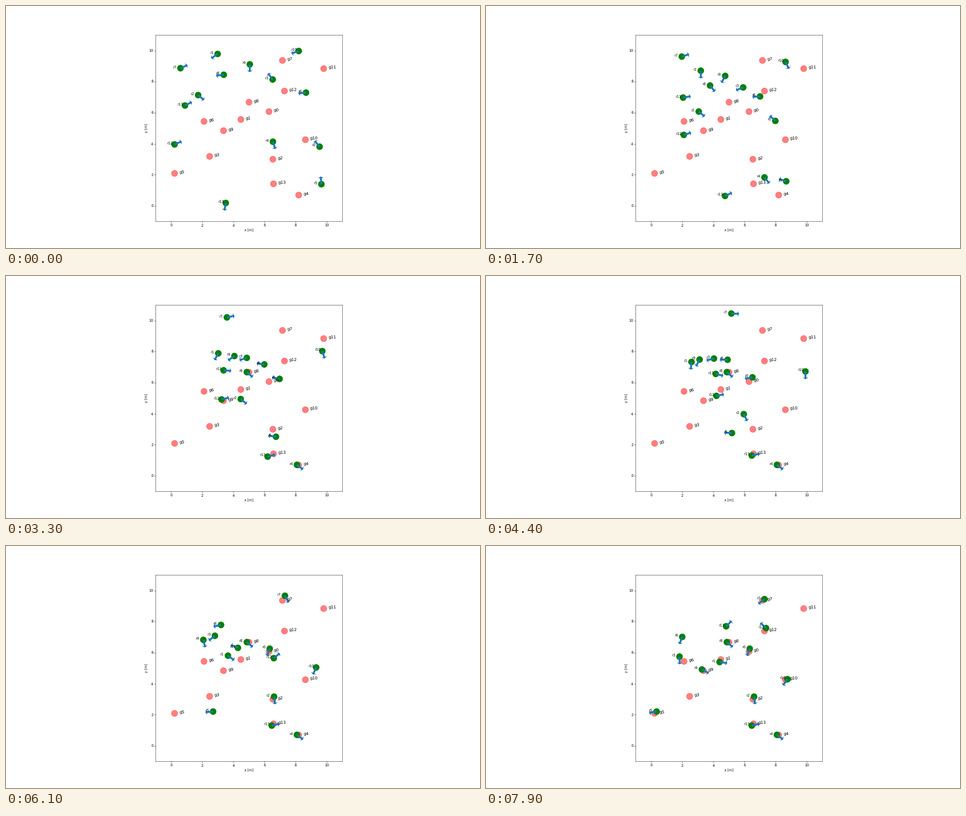
These frames come from a looping animation (1046x535 px, 8 s). A matplotlib script:

```python
import numpy as np
import matplotlib.pyplot as plt
from matplotlib.animation import FuncAnimation
from matplotlib.patches import Arrow, Circle
from matplotlib.transforms import Affine2D

W, H, DPI = 1046, 535, 54.48
STEPS, INTERVAL = 80, 100
RADIUS = 0.2

plt.rcParams.update({"font.family": "DejaVu Sans", "text.hinting": "none"})
# the tiny surplus guards against rounding down to W-1 or H-1
fig = plt.figure(figsize=((W + 1e-3) / DPI, (H + 1e-3) / DPI), dpi=DPI,
                 facecolor="white")
ax = fig.add_subplot()
ax.set_aspect("equal")
ticks = range(0, 11, 2)
ax.set(xlim=(-1, 11), ylim=(-1, 11), xticks=ticks, yticks=ticks)
ax.set_xlabel("x [m]", labelpad=3)
ax.set_ylabel("y [m]", labelpad=3)


def metres(px, py):
    """Stage pixels (y down) to axes metres (y up)."""
    scale = 12 / (0.77 * H)
    return np.array([(px - 0.5125 * W) * scale + 5, (0.89 * H - py) * scale - 1])


class Robot:
    """Follows a smooth curve from a start pose to a stop pose.

    The start is (x, y), the other points (step, x, y). Headings are given at
    both ends; in between the robot faces the way it travels.
    """

    def __init__(self, name, start, face, points, stop_face):
        t, px, py = np.array([(0, *start), *points], float).T
        self.t = t
        self.pos = metres(px, py).T
        self.vel = np.gradient(self.pos, t, axis=0)
        angle = np.arctan2(self.vel[:, 1], self.vel[:, 0])
        for end, deg in ((0, face), (-1, stop_face)):
            angle[end] = np.radians(deg)
            ahead = np.array([np.cos(angle[end]), np.sin(angle[end])])
            self.vel[end] = ahead * max(0, ahead @ self.vel[end])
        self.angle = np.unwrap(angle)
        self.body = ax.add_patch(Circle((0, 0), RADIUS, color="green"))
        self.arrow = ax.add_patch(Arrow(0, 0, 0.5, 0, width=0.6))
        self.label = ax.text(0, 0, name, fontsize=10, color="k")

    def place(self, step):
        """Cubic Hermite curve through the points."""
        if step >= self.t[-1]:
            return self.pos[-1]
        i = np.searchsorted(self.t, step, side="right") - 1
        span = self.t[i + 1] - self.t[i]
        f = (step - self.t[i]) / span
        a, b = self.pos[i:i + 2]
        va, vb = self.vel[i:i + 2] * span
        ease = f * f * (3 - 2 * f)
        return a + (b - a) * ease + f * (1 - f) * (va * (1 - f) - vb * f)

    def move(self, step):
        x, y = self.place(step)
        angle = np.interp(step, self.t, self.angle)
        self.body.center = x, y
        self.arrow.set_transform(
            Affine2D().rotate(angle).translate(x, y) + ax.transData)
        self.label.set_position((x - 0.5, y))


goals = [(6.29, 6.07), (4.48, 5.56), (6.54, 3.00), (2.475, 3.185), (8.20, 0.695),
         (0.22, 2.09), (2.115, 5.44), (7.155, 9.365), (5.005, 6.675),
         (3.365, 4.84), (8.63, 4.26), (9.805, 8.84), (7.285, 7.395), (6.58, 1.42)]
for n, (gx, gy) in enumerate(goals):
    ax.add_patch(Circle((gx, gy), RADIUS, color="red", alpha=0.5))
    ax.text(gx + 0.3, gy, f"g{n}", fontsize=12, color="k")

robots = []


def robot(start, face, *points, stop):
    robots.append(Robot(f"r{len(robots)}", start, face, points, stop))


robot((692, 311), 130, (17, 638.5, 254), (44, 588, 224), (50, 582, 227), stop=249)
robot((467, 106), 215, (17, 474, 143), (33, 468.5, 171), (44, 453.5, 190),
      (69, 515.5, 256.5), stop=352)
robot((424, 197), -40, (33, 518, 272), (52, 591.5, 333), stop=-82)
robot((588.5, 162.5), 127, (17, 567.5, 180), (44, 503, 182.5), (61, 461, 198.5),
      (79, 427, 244.5), stop=272)
robot((589, 300), -72, (28, 642, 417.5), stop=-37)
robot((696, 394), 95, (17, 662.5, 387.5), (40, 562, 346.5), (61, 457, 366),
      (78, 376.5, 366), stop=191)
robot((662, 191.5), 186, (10, 624, 198.5), (33, 570, 195.5), (61, 474.5, 174.5),
      (79, 433, 201), stop=249)
robot((385, 137.5), 24, (33, 487.5, 91.5), (44, 541.5, 83), (61, 615.5, 110),
      (66, 614.5, 117.5), stop=-142)
robot((480.5, 152), 187, (10, 483, 161.5), (31, 531.5, 212.5), stop=-40)
robot((538, 129), 270, (33, 504, 177), (61, 435.5, 207.5), (77, 476.5, 273),
      stop=-28)
robot((646, 99.5), 199, (10, 649, 111.5), (33, 698, 166), (44, 705, 211),
      (70, 665.5, 294.5), stop=233)
robot((395, 220), 27, (17, 435, 202.5), (44, 507, 216.5), (54, 523, 221),
      (64, 508, 224), (79, 530, 177.5), stop=45)
robot((372, 306), 23, (17, 436.5, 285), (44, 508.5, 265), (61, 591, 248),
      (77, 618, 181.5), stop=137)
robot((485, 435.5), 260, (10, 495, 436), (17, 527.5, 420), (36, 586.5, 397),
      stop=13)


def update(step):
    for r in robots:
        r.move(step)


anim = FuncAnimation(fig, update, frames=STEPS, interval=INTERVAL,
                     repeat=True, repeat_delay=0, blit=False)
plt.show()
```
